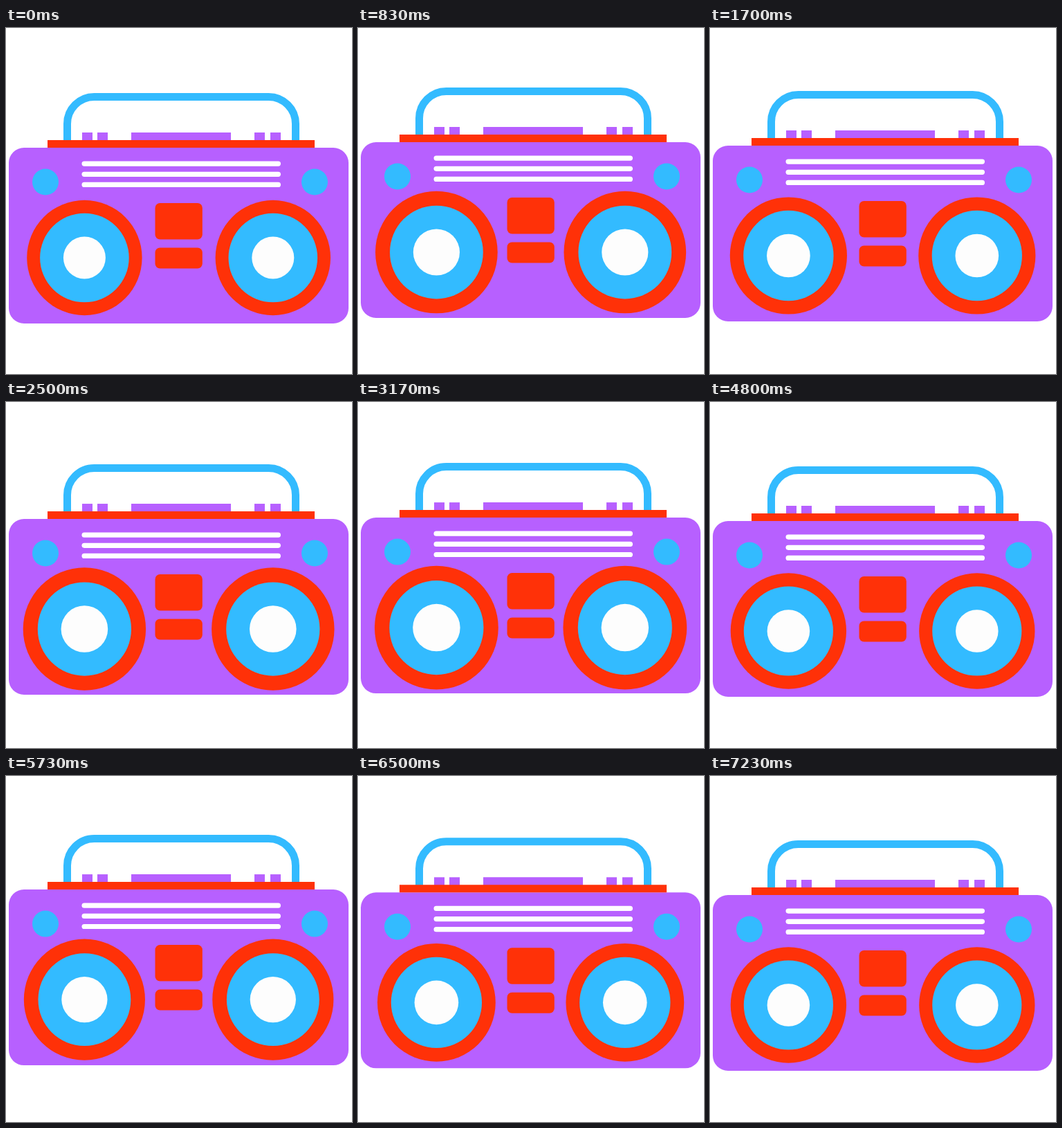
Animation, 500 px wide and 500 px high, one loop 7.26 s. Source, as an HTML page with a canvas:

```html
<!DOCTYPE html>
<html lang="en">
<head>
<meta charset="utf-8">
<title>Boombox</title>
<style>
  html, body { margin: 0; width: 100%; height: 100%; overflow: hidden; background: #fff; }
  canvas { display: block; width: 100vw; height: 100vh; }
</style>
</head>
<body>
<canvas id="stage" width="500" height="500"></canvas>
<script>
const ctx = document.getElementById('stage').getContext('2d');
const PURPLE = '#b760ff', BLUE = '#33bbff', RED = '#ff3108', WHITE = '#fff', CONE = '#fdfdfd';
const LOOP = 7260;
const LIFT = 9;

function box(x, y, w, h, r, color) {
  ctx.fillStyle = color;
  ctx.beginPath();
  ctx.roundRect(x, y, w, h, r);
  ctx.fill();
}

function disc(x, y, r, color) {
  ctx.fillStyle = color;
  ctx.beginPath();
  ctx.arc(x, y, r, 0, Math.PI * 2);
  ctx.fill();
}

function handle() {
  ctx.strokeStyle = BLUE;
  ctx.lineWidth = 11;
  ctx.beginPath();
  ctx.moveTo(88.5, 164);
  ctx.arcTo(88.5, 99.5, 253, 99.5, 39);
  ctx.arcTo(418.5, 99.5, 418.5, 164, 39);
  ctx.lineTo(418.5, 164);
  ctx.stroke();
}

function speaker(x, grow) {
  disc(x, 332, 83.2 + grow, RED);
  disc(x, 332, 64.3 + grow * 0.6, BLUE);
  disc(x, 332, 30.5 + grow * 0.6, CONE);
}

// Ticks run at 30 per second; the first four beats move only on two ticks of three.
function tickAt(t) {
  const part = t % 100;
  const sub = part < 30 ? 0 : part < 70 || t < 2400 ? 1 : 2;
  return 3 * Math.floor(t / 100) + sub;
}

function beatAt(t) {
  const tick = tickAt(t);
  return (tick < 72 ? tick / 18 : (tick - 72) / 18.25) % 1;
}

// Quick rise that slows at the top, then a steady fall.
function liftAt(p) {
  return p < 0.5 ? LIFT * (1 - Math.pow(1 - 2 * p, 1.45)) : LIFT * 2 * (1 - p);
}

// Short attack, long steady release.
function growAt(p) {
  return p < 0.2 ? 6.72 * p / 0.2 : 8.4 * (1 - p);
}

function draw(t) {
  const p = beatAt(t);
  const grow = growAt(p);
  ctx.fillStyle = WHITE;
  ctx.fillRect(0, 0, 500, 500);
  ctx.save();
  ctx.translate(0, -liftAt(p));

  handle();
  for (const x of [110, 132, 359, 382]) box(x, 151, 15, 12, 0, PURPLE);
  box(181, 151, 144, 12, 0, PURPLE);
  box(4, 173, 491, 254, 22, PURPLE);
  box(60, 162, 386, 11, 0, RED);

  for (const y of [192.5, 207.7, 222.8]) box(109.5, y, 287.5, 7.2, 3.6, WHITE);
  for (const x of [57, 446]) disc(x, 222.5, 19, BLUE);
  box(215.5, 253, 68.3, 52.5, 7, RED);
  box(215.5, 317.5, 68.3, 30, 7, RED);
  for (const x of [113.4, 385.8]) speaker(x, grow);

  ctx.restore();
}

const start = performance.now();

function loop() {
  draw((performance.now() - start) % LOOP);
  requestAnimationFrame(loop);
}

loop();
</script>
</body>
</html>
```
